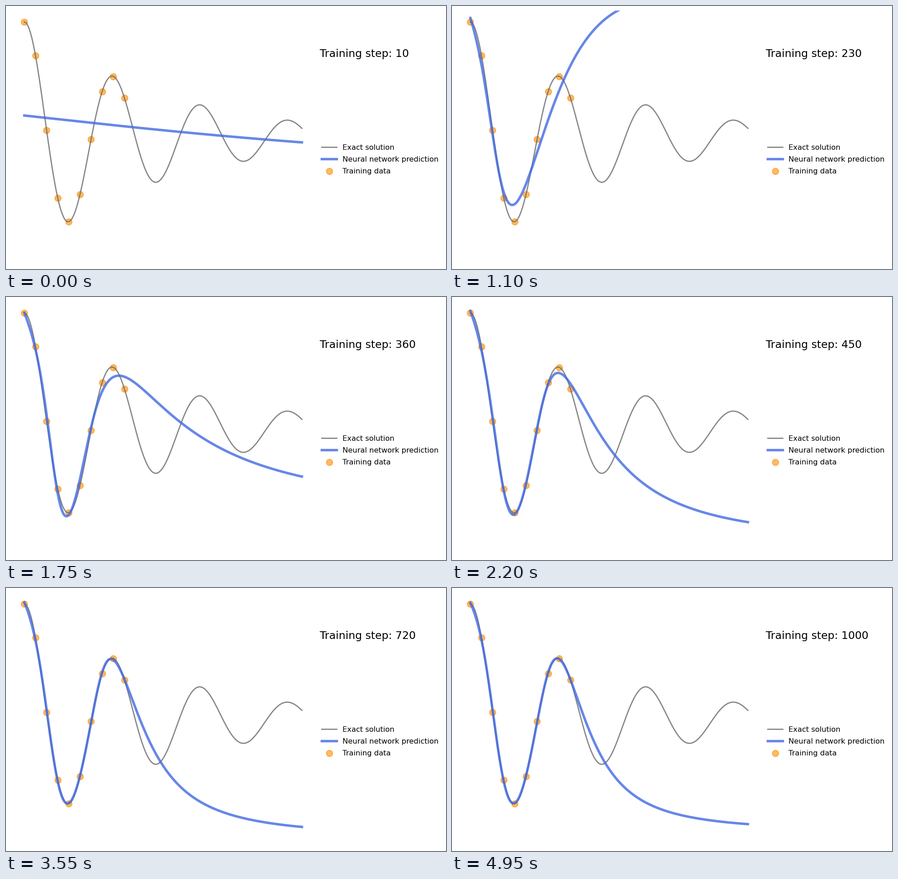
Animation of 969x578 px, one loop 5 s. Source, as a matplotlib script:

```python
import numpy as np
import matplotlib.pyplot as plt
from matplotlib.animation import FuncAnimation

WIDTH, HEIGHT, DPI = 969, 578, 128
K = 97.88 / DPI                      # point sizes are drawn at about 98 dpi
LEFT, BOTTOM, AX_W, AX_H = 9.8, 9.8, 672.4, 558.4
N_FRAMES, EVERY = 100, 10
SHAPES = [(32, 1), (32, 32), (32, 32), (1, 32)]


def oscillator(t, d=2, w0=20):
    """Underdamped oscillator released from rest at 1."""
    w = np.sqrt(w0**2 - d**2)
    phi = np.arctan(-d / w)
    return np.exp(-d * t) * np.cos(phi + w * t) / np.cos(phi)


def layer_views(flat):
    """Weight and bias views into one flat parameter vector."""
    layers, pos = [], 0
    for rows, cols in SHAPES:
        mid = pos + rows * cols
        layers.append((flat[pos:mid].reshape(rows, cols), flat[mid:mid + rows]))
        pos = mid + rows
    return layers


def initial_params(seed):
    """Uniform start values within 1 / sqrt(inputs) of zero."""
    size = sum(r * c + r for r, c in SHAPES)
    bits = np.random.RandomState(seed).randint(0, 2**32, size, dtype=np.uint32)
    flat = (bits & 0xFFFFFF) / 2**24 * 2 - 1
    for w, b in layer_views(flat):
        bound = w.shape[1] ** -0.5
        w *= bound
        b *= bound
    return flat


def forward(layers, t):
    acts = [t[:, None]]
    for w, b in layers[:-1]:
        acts.append(np.tanh(acts[-1] @ w.T + b))
    w, b = layers[-1]
    return acts, acts[-1] @ w.T + b


def train(seed=123, rate=1e-3, b1=0.9, b2=0.999):
    """Fit a tanh network with Adam, keeping the curve every few steps."""
    params = initial_params(seed)
    grad = np.zeros_like(params)
    m, v = np.zeros_like(params), np.zeros_like(params)
    layers, grads = layer_views(params), layer_views(grad)
    curves = []
    for step in range(1, N_FRAMES * EVERY + 1):
        acts, out = forward(layers, x_data)
        delta = 2 * (out - y_data[:, None]) / len(x_data)
        for (w, _), (gw, gb), a in zip(layers[::-1], grads[::-1], acts[::-1]):
            gw[:] = delta.T @ a
            gb[:] = delta.sum(axis=0)
            delta = (delta @ w) * (1 - a**2)
        m += (1 - b1) * (grad - m)
        v += (1 - b2) * (grad**2 - v)
        denom = np.sqrt(v / (1 - b2**step)) + 1e-8
        params -= rate / (1 - b1**step) * m / denom
        if step % EVERY == 0:
            curves.append(forward(layers, x)[1][:, 0])
    return curves


x = np.linspace(0, 1, 500)
y = oscillator(x)
x_data, y_data = x[0:200:20], y[0:200:20]
curves = train()

plt.rcParams["font.family"] = "DejaVu Sans"
fig = plt.figure(figsize=(WIDTH / DPI, HEIGHT / DPI), dpi=DPI, facecolor="white")
ax = fig.add_axes([LEFT / WIDTH, BOTTOM / HEIGHT, AX_W / WIDTH, AX_H / HEIGHT])
ax.set_xlim(-0.05, 1.05)
ax.set_ylim(-1.1, 1.1)
ax.axis("off")

ax.plot(x, y, color="dimgrey", lw=2 * K, alpha=0.8, label="Exact solution")
fit, = ax.plot(x, curves[0], color="royalblue", lw=4 * K, alpha=0.8,
               label="Neural network prediction")
ax.scatter(x_data, y_data, s=100 * K**2, color="darkorange", alpha=0.6,
           linewidth=1.5 * K, label="Training data")
ax.legend(loc=(1.01, 0.342), frameon=False, fontsize=12 * K, labelspacing=0.67)
caption = ax.text(1.065, 0.698, "", fontsize=17.28 * K, color="black")


def update(i):
    fit.set_ydata(curves[i])
    caption.set_text(f"Training step: {(i + 1) * EVERY}")
    return fit, caption


anim = FuncAnimation(fig, update, frames=N_FRAMES, interval=50,
                     repeat=True, repeat_delay=0)
plt.show()
```
